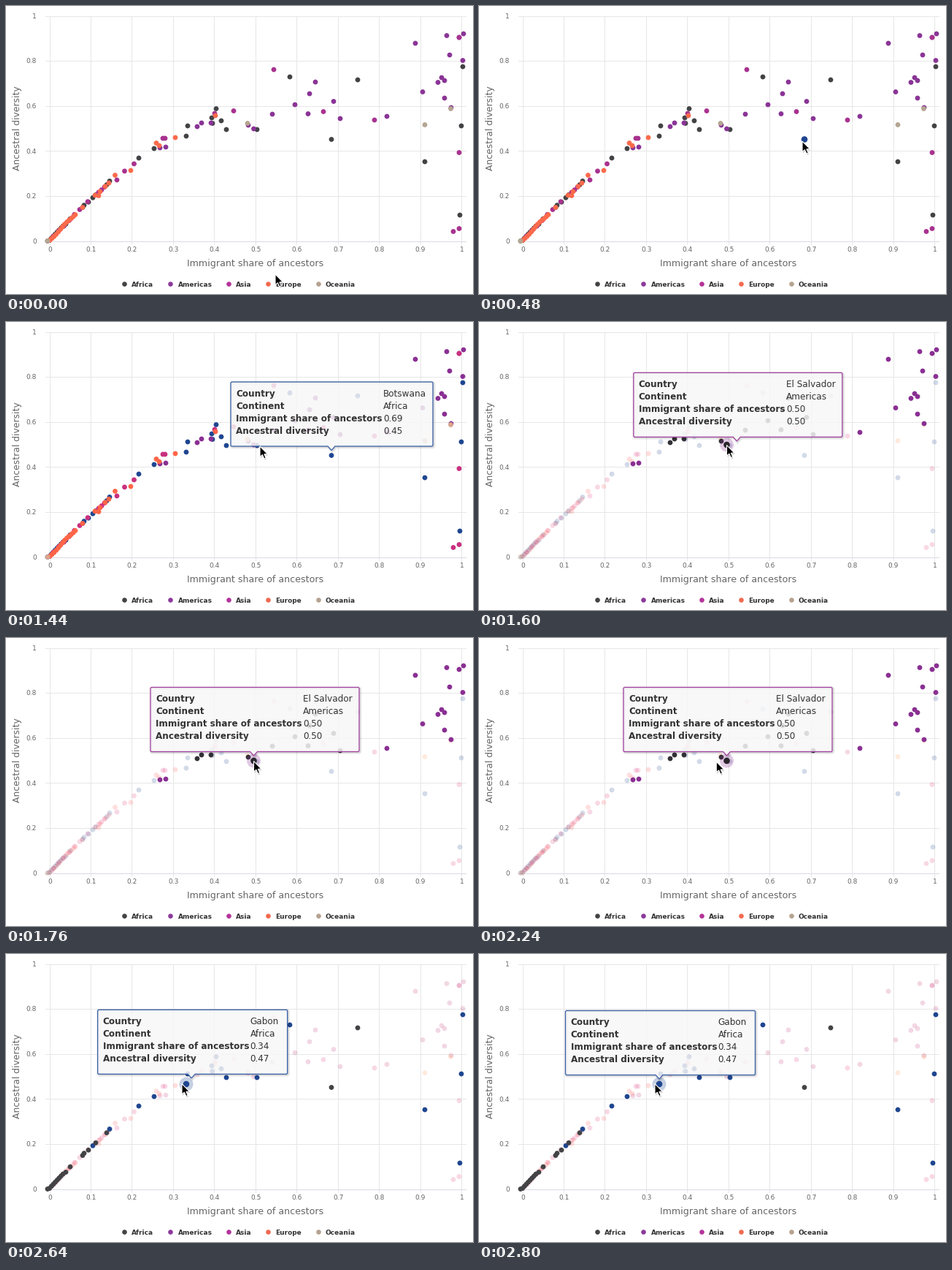
These frames come from a looping animation (640 px wide and 394 px high, 3.12 s). A matplotlib script:

```python
import numpy as np
import matplotlib.pyplot as plt
from matplotlib.animation import FuncAnimation
from matplotlib.colors import to_rgb
from matplotlib.patches import Circle, Polygon

W, H, DPI = 640, 394, 100
STEP, FRAMES = 80, 39
PX = 72 / DPI  # points per pixel

NAMES = ["Africa", "Americas", "Asia", "Europe", "Oceania"]
AFRICA, AMERICAS, ASIA, EUROPE, OCEANIA = range(5)


def trend(*xs):
    """Dots that follow the common curve of diversity over share."""
    x = np.hstack(xs).astype(float)
    v = (x - 59.5) / 564.5
    y = 321.5 - 308 * (2 * v - 1.6 * v * v) + .8 * np.sin(2.4 * x)
    return np.column_stack([x, np.minimum(y, 321.5)])


# Dot centres in stage pixels; the crowded corner follows the trend.
africa = [(389, 97), (482, 101), (626, 83), (624, 164), (574, 213), (622, 286),
          (446, 182.5), (344, 169), (288, 140.5), (282, 153), (283, 160.5),
          (295, 157), (302, 169), (249, 164), (247, 178), (182, 208),
          (203, 195), (142, 239.5)]
americas = [(561, 51), (604, 40.5), (627, 38), (621, 43), (608, 67),
            (626, 74.5), (597, 98), (601, 102), (592, 104.5), (571, 117.5),
            (601, 126), (610, 139), (522, 151), (458, 154), (449, 130.5),
            (424, 104), (416, 120), (396, 135), (414, 147.5), (365, 148),
            (339.5, 168), (332, 163), (281, 160), (268, 160), (262, 165),
            (219, 193), (211, 194)]
asia = [(621, 43), (621, 200.5), (613, 308.5), (621, 304.5), (505, 156),
        (367, 87), (312, 143.5), (435, 144.5), (286, 147), (215, 181),
        (218, 181), (152, 238)]
europe = [(287, 150), (232, 180), (206, 187.5), (210, 191), (171, 225),
          (149.5, 231.5), (127, 259.5)]
oceania = [(574, 162.5), (609.5, 140.5), (331, 160.5), (57, 321.5)]

corner = [trend(np.linspace(57, 78, 9), 82, 88, 105, 107, 113, 119, 123, 138),
          np.empty((0, 2)),
          trend(np.linspace(65, 101, 6), 112, 127, 131, 135, 162.5, 175.5),
          trend(np.linspace(60, 95, 13), 105, 122, 129, 136, 141),
          np.empty((0, 2))]
DOTS = [np.vstack([far, near]) for far, near in
        zip((africa, americas, asia, europe, oceania), corner)]

DARK, BLUE, PURPLE = "#434346", "#1f4690", "#8a2f93"
BASE = [DARK, "#8a3496", "#a8328f", "#fb6a4c", "#b5a592"]
VIVID = [BLUE, "#8a2f93", "#c9307f", "#ff6547", "#d9a58c"]
MIXED = ["#4c70a8", "#46222f", "#e58fbb", "#ee7064", "#cbbdc0"]
GHOST = [BLUE, "#c03a78", "#e0407f", "#ff5a5a", "#ff9a50"]
LEGEND = [DARK, "#8b3a9a", "#b5339a", "#f26a4f", "#b5a28f"]

# name, continent, share, diversity, dot, box width
CARDS = {
    "bw": ("Botswana", AFRICA, "0.69", "0.45", africa[6], 277),
    "sv": ("El Salvador", AMERICAS, "0.50", "0.50", americas[20], 286),
    "ci": ("Côte d’Ivoire", AFRICA, "0.43", "0.50", africa[12], 299),
    "ga": ("Gabon", AFRICA, "0.34", "0.47", africa[14], 260),
}
SLIDES = [(1520, "bw", "sv"), (2320, "sv", "ci"), (2560, "ci", "ga")]

CURSOR = [(0, 369, 367), (480, 443, 185), (560, 439, 180), (1040, 439, 180),
          (1440, 348, 170), (1520, 339.5, 168.5), (2160, 339.5, 168.5),
          (2480, 248.5, 173), (2640, 241, 177.5), (3120, 241, 177.5)]
ARROW = np.array([(0, 0), (0, 14.5), (3.4, 11.6), (5.8, 17), (8.2, 16),
                  (5.9, 10.8), (10.4, 10.6)])

plt.rcParams["font.family"] = "DejaVu Sans"
fig = plt.figure(figsize=(W / DPI, H / DPI), dpi=DPI, facecolor="white")
ax = fig.add_axes([0, 0, 1, 1])
ax.set_xlim(0, W)
ax.set_ylim(H, 0)
ax.axis("off")


def label(x, y, s, size, color, **kw):
    return ax.text(x, y, s, fontsize=size * PX, color=color, **kw)


def dots(points, r, color, z):
    p = np.atleast_2d(points)
    return ax.scatter(p[:, 0], p[:, 1], s=(2 * r * PX) ** 2, c=color,
                      linewidths=0, zorder=z)


def draw_axes():
    for i in range(11):
        x = 59.5 + 56.45 * i
        ax.plot([x, x], [13.5, 325.5], color="#e6e6e6", lw=PX, zorder=0)
        label(x + .5, 336.5, f"{i / 10:g}", 9, "#666666", ha="center")
    for i in range(6):
        y = 321.5 - 61.6 * i
        ax.plot([54, 630], [y, y], color="#d8dbe2" if i == 0 else "#e6e6e6",
                lw=PX, zorder=0)
        label(42, y + 3.2, f"{i / 5:g}", 9, "#666666", ha="right")
    label(342, 356, "Immigrant share of ancestors", 12.6, "#666666",
          ha="center")
    label(15.5, 167.5, "Ancestral diversity", 12.4, "#666666", rotation=90,
          ha="center", va="center")
    for name, color, x in zip(NAMES, LEGEND, (161.5, 225, 304.5, 359, 427.5)):
        dots((x, 380), 3.3, color, 3)
        label(x + 10.5, 383.5, name, 9, "#333333", weight="bold")


draw_axes()
series = [dots(d, 3.4, BASE[k], 3 + k) for k, d in enumerate(DOTS)]
halo = ax.add_patch(Circle((0, 0), 9.5, lw=0, zorder=9))
spot = ax.add_patch(Circle((0, 0), 4.3, lw=0, zorder=10))

shade = [ax.add_patch(Polygon(ARROW, fill=False, ec="black", lw=w * PX,
                              zorder=11)) for w in (5, 3, 1)]
card = ax.add_patch(Polygon(ARROW, lw=1.3 * PX, zorder=12))
keys = [label(0, 0, s, 12, "#333333", weight="bold", zorder=13)
        for s in ("Country", "Continent", "Immigrant share of ancestors",
                  "Ancestral diversity")]
vals = [label(0, 0, "", 12, "#333333", zorder=13) for _ in keys]
arrow_shadow = ax.add_patch(Polygon(ARROW, fc="black", lw=0, alpha=.2,
                                    zorder=19))
arrow = ax.add_patch(Polygon(ARROW, fc="black", ec="white", lw=1.1 * PX,
                             zorder=20))


def state_at(t):
    """Palette, focused continent, dimming, hovered dot, card, card opacity."""
    if t < 480:
        return "base", None, 0, None, None, 0
    if t < 560:
        return "base", None, 0, "bw", None, 0
    if t < 1200:
        easing = t < 640 or t >= 1120
        return ("blue", AFRICA, .5 if easing else 1, "bw", "bw",
                .6 if t < 640 else 1)
    if t < 1520:
        return "vivid", None, 0, None, "bw", 1
    if t < 1600:
        return "vivid", AMERICAS, .5, "sv", "sv", 1
    if t < 2320:
        return "plum", AMERICAS, 1, "sv", "sv", 1
    if t < 2480:
        return "mixed", AFRICA, .5, "ci", "ci", 1
    if t < 2560:
        return "mixed", None, 0, "ci", "ci", 1
    return "late", AFRICA, .6 if t < 2640 else 1, "ga", "ga", 1


def ease(u):
    return u * u * (3 - 2 * u)


def cursor_at(t):
    for (t0, *a), (t1, *b) in zip(CURSOR, CURSOR[1:]):
        if t <= t1:
            u = ease((t - t0) / (t1 - t0))
            return np.array(a) * (1 - u) + np.array(b) * u


def tint(k, palette):
    """Colour of every dot of continent k, as an RGB array."""
    x = DOTS[k][:, 0]
    table = {"base": BASE, "mixed": MIXED}.get(palette, VIVID)
    rgb = np.tile(to_rgb(table[k]), (len(x), 1))
    if k == AFRICA and palette in ("blue", "late", "mixed"):
        dark = (x < 116) | (x == 123) | (x == 138)
        if palette == "late":
            dark |= (x > 440) & (x < 500)
        rgb[dark] = to_rgb(DARK)
    if k == AMERICAS and palette == "plum":
        rgb[(x > 230) & (x < 500)] = to_rgb("#333036")
    if k == EUROPE and palette == "mixed":
        rgb[x > 140] = to_rgb("#d9a0a2")
    return rgb


def paint_dots(palette, focus, dim):
    for k, s in enumerate(series):
        faded = focus is not None and k != focus
        rgb = tint(k, palette)
        if faded and dim > .55:
            rgb[:] = to_rgb(GHOST[k])
        alpha = np.full((len(rgb), 1), 1 - .8 * dim if faded else 1.0)
        s.set_facecolors(np.hstack([rgb, alpha]))
        s.set_zorder(8 if k == focus else 3 + k)


def paint_hover(key, focus, palette):
    for p in (halo, spot):
        p.set_visible(key is not None)
    if key is None:
        return
    _, k, _, _, pos, _ = CARDS[key]
    halo.set_visible(focus is not None)
    halo.center = spot.center = pos
    color = BLUE if k == AFRICA else PURPLE
    halo.set_facecolor((*to_rgb(color), .25))
    if palette == "mixed":
        color = MIXED[AFRICA]
    elif palette == "plum":
        color = "#2a252c"
    spot.set_facecolor(color)


def card_anchor(key, t):
    pos = np.array(CARDS[key][4])
    for t0, a, b in SLIDES:
        n = (t - t0) / STEP + 1
        if b == key and 0 < n < 4:
            pos = pos + (np.array(CARDS[a][4]) - pos) * .36 ** n
    return pos


def paint_card(key, alpha, t):
    for p in (*shade, card, *keys, *vals):
        p.set_visible(key is not None)
    if key is None:
        return
    name, k, share, div, _, width = CARDS[key]
    x, y = card_anchor(key, t)
    left = x - width / 2 + (.5 if key == "bw" else 1.5)
    right, top, low, c = left + width, y - 100.5, y - 12.5, 1.2
    shape = np.array([
        (left + c, top), (right - c, top), (right, top + c), (right, low - c),
        (right - c, low), (x + 5, low), (x, low + 5.5), (x - 5, low),
        (left + c, low), (left, low - c), (left, top + c)])
    for s in shade:
        s.set_xy(shape + 1)
        s.set_alpha(.06 * alpha)
    card.set_xy(shape)
    card.set_facecolor((*to_rgb("#f7f7f7"), .86 * alpha))
    edge = "#3c62a8" if k == AFRICA else "#a344a0"
    card.set_edgecolor((*to_rgb(edge), alpha))
    for i, (a, b, s) in enumerate(
            zip(keys, vals, (name, NAMES[k], share, div))):
        base = y - 80.8 + 17 * i
        a.set_position((left + 7, base))
        b.set_position((left + 209, base))
        b.set_text(s)
        a.set_alpha(alpha)
        b.set_alpha(alpha)


def update(i):
    t = i * STEP
    palette, focus, dim, hover, key, alpha = state_at(t)
    paint_dots(palette, focus, dim)
    paint_hover(hover, focus, palette)
    paint_card(key, alpha, t)
    tip = cursor_at(t)
    arrow.set_xy(ARROW + tip)
    arrow_shadow.set_xy(ARROW + tip + (.8, 1.8))
    return []


anim = FuncAnimation(fig, update, frames=FRAMES, interval=STEP, repeat=True,
                     repeat_delay=0, init_func=lambda: update(0))
plt.show()
```
